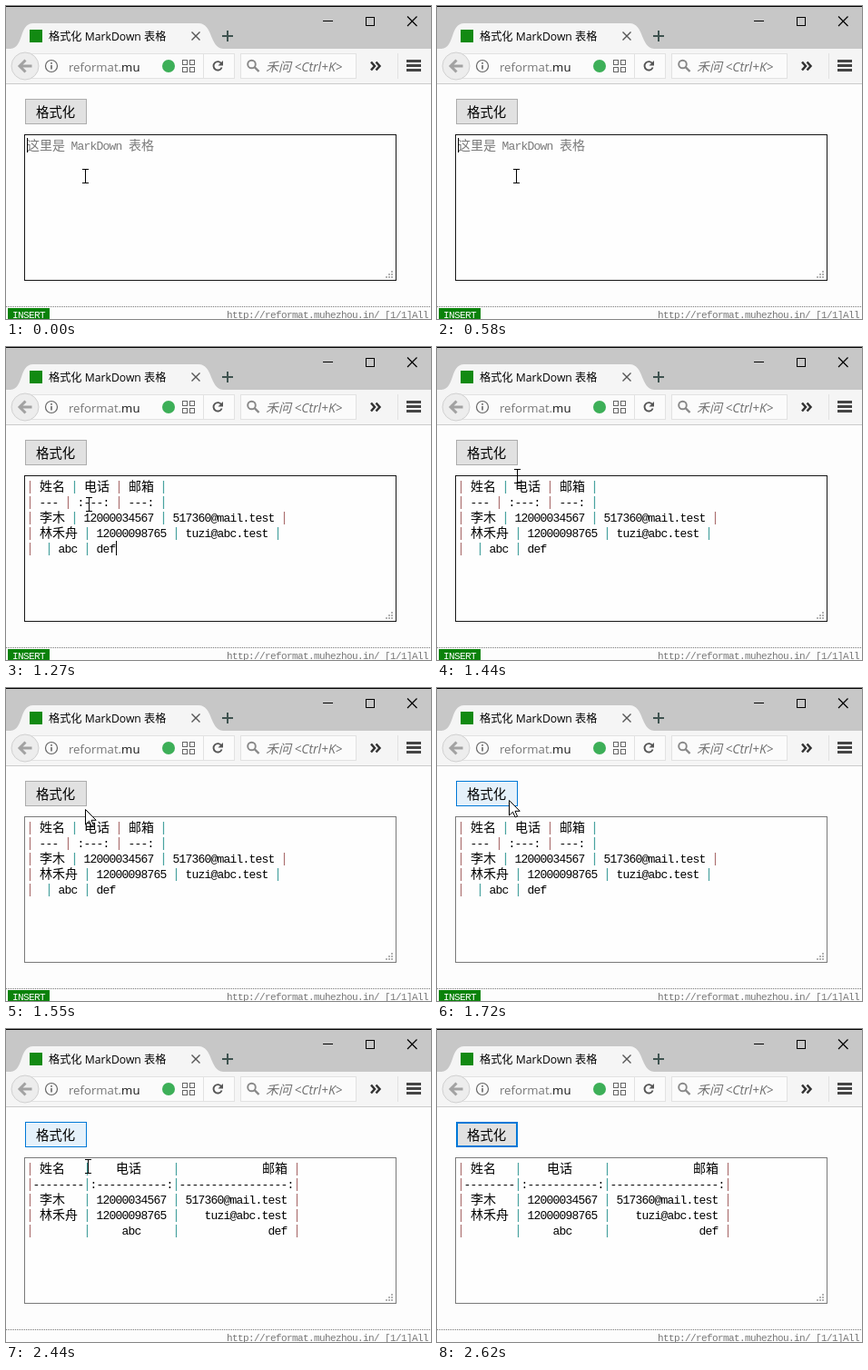
Animation of 468 by 344 pixels, one loop 3 s. Source, as an HTML page:

```html
<!DOCTYPE html>
<html lang="zh">
<head>
<meta charset="utf-8">
<style>
html, body { margin: 0; width: 100%; height: 100%; overflow: hidden; background: #fdfdfd; }
svg { display: block; }
text { white-space: pre; font-family: "Open Sans", "Noto Sans CJK SC", "Noto Sans CJK", sans-serif; }
.mono { font: 13px "Liberation Mono", monospace; letter-spacing: -0.8px; }
.small { font-size: 11px; letter-spacing: -0.6px; }
.pipe { font-size: 15px; }
.cjk { font-family: "Noto Sans CJK SC", "Noto Sans CJK", sans-serif; font-size: 14px; }
.line { fill: none; stroke: #000; shape-rendering: crispEdges; }
</style>
</head>
<body>
<svg width="468" height="344" viewBox="0 0 468 344">
  <!-- title bar and tab -->
  <rect width="468" height="47" fill="#c7c7c7"/>
  <rect width="468" height="1" fill="#000"/>
  <rect y="47" width="468" height="38" fill="#f5f5f5"/>
  <rect y="85" width="468" height="1" fill="#cbcbcb"/>
  <path d="M5 47C20 46 14 19 30 19H212C228 19 224 46 239 47Z" fill="#f5f5f5"/>
  <rect x="26" y="26" width="14" height="14" fill="#128a12"/>
  <text x="47" y="37.500" font-size="12.2">格式化 MarkDown 表格</text>
  <path d="M204.500 28.500l9 9m0-9l-9 9" stroke="#555" stroke-width="1.400"/>
  <path d="M238 33h12m-6-6v12" stroke="#3f5350" stroke-width="2"/>
  <path class="line" d="M349 16.500h11M396.500 12.500h9v9h-9z"/>
  <path d="M442 11.500l10.500 10.500m0-10.500l-10.500 10.500" stroke="#000" stroke-width="1.200"/>

  <!-- toolbar -->
  <rect x="28.500" y="52.500" width="223" height="27" fill="#fbfbfb" stroke="#e2e2e2"/>
  <circle cx="21" cy="66" r="15" fill="#ededed" stroke="#d0d0d0"/>
  <path d="M28.500 66H15m6.500-6.500l-6.500 6.500 6.500 6.500" fill="none" stroke="#a2a2a2" stroke-width="3"/>
  <circle cx="50" cy="66" r="6.500" fill="none" stroke="#666" stroke-width="1.200"/>
  <path d="M50 62v1.800M50 65v4.500" stroke="#666" stroke-width="1.600"/>
  <clipPath id="url"><rect x="60" y="53" width="87" height="26"/></clipPath>
  <text x="69" y="71.500" font-size="13.2" fill="#777" clip-path="url(#url)">reformat.<tspan fill="#111">muhe</tspan></text>
  <circle cx="179" cy="66" r="7" fill="#3daf58"/>
  <path class="line" style="stroke:#666" d="M194.500 59.500h5v5h-5zM202.500 59.500h5v5h-5zM194.500 67.500h5v5h-5zM202.500 67.500h5v5h-5z"/>
  <path class="line" style="stroke:#e2e2e2" d="M217.500 53v26M431.500 52v28"/>
  <path d="M237.300 63.500a4.700 4.700 0 1 0 .3 4" fill="none" stroke="#555" stroke-width="1.900"/>
  <path d="M239 60v5.500h-5.500z" fill="#555"/>
  <rect x="258.500" y="52.500" width="127" height="27" fill="#fbfbfb" stroke="#e2e2e2"/>
  <circle cx="270.500" cy="64" r="4.300" fill="none" stroke="#888" stroke-width="1.900"/>
  <path d="M273.500 67l5 5" stroke="#888" stroke-width="2.400"/>
  <text x="286" y="71.500" font-size="14" font-style="italic" fill="#707070">禾问 &lt;Ctrl+K&gt;</text>
  <path d="M402 61.500l4 4.500-4 4.500m5.500-9l4 4.500-4 4.500" fill="none" stroke="#333" stroke-width="2.500"/>
  <path d="M441 60.500h16m-16 5h16m-16 5h16" stroke="#444" stroke-width="3"/>

  <!-- page -->
  <rect id="btn"/>
  <text class="cjk" x="33" y="122" style="font-size:14.4px">格式化</text>
  <rect id="area" x="20.500" y="141.500" width="409" height="160" fill="#fefefe"/>
  <path d="M418 297h2v2h-2zm3 0h2v2h-2zm3 0h2v2h-2zm-3-3h2v2h-2zm3 0h2v2h-2zm0-3h2v2h-2z" fill="#b4b4b4"/>
  <g id="hint"></g>
  <g id="raw"></g>
  <g id="neat"></g>
  <rect id="caret" width="1" height="16"/>

  <!-- status line -->
  <path class="line" d="M0 330.500h468" style="stroke:#777" stroke-dasharray="1 1"/>
  <g id="mode">
    <rect x="2" y="332" width="46" height="12" fill="#0a820a"/>
    <text class="mono small" x="7" y="342.500" fill="#fff">INSERT</text>
  </g>
  <text class="mono small" x="243" y="342.500" fill="#777">http://reformat.muhezhou.in/ [1/1]All</text>

  <path id="beam" class="line" d="M-3.500-7.500h3l.5.5.5-.5h3M0-7v14M-3.500 7.500h3l.5-.5.5.5h3"/>
  <path id="arrow" d="M0 0V16.500L4 12.700 6.600 18.500 9 17.500 6.500 11.800H11.700Z" fill="#fff" stroke="#000"/>
</svg>
<script>
const $ = id => document.getElementById(id);
const LOOP = 3000, PASTE = 750, PRESS = 1860, RELEASE = 1960;

const people = [['李木', '12000034567', '517360@mail.test'], ['林禾舟', '12000098765', 'tuzi@abc.test']];
const cells = s => [...s].reduce((n, c) => n + (c > '\u2e80' ? 2 : 1), 0);
const gap = n => ' '.repeat(n);
const left = (s, n) => s + gap(n - cells(s));
const right = (s, n) => gap(n - cells(s)) + s;
const middle = (s, n) => left(gap((n - cells(s)) >> 1) + s, n);
const head = ['姓名', '电话', '邮箱'];

const rawRows = [
  `| ${head.join(' | ')} |`,
  '| --- | :---: | ---: |',
  ...people.map(p => `| ${p.join(' | ')} |`),
  '|  | abc | def'
];
const neatRows = [head, ...people, ['', 'abc', 'def']]
  .map(([a, b, c]) => `| ${left(a, 6)} | ${middle(b, 11)} | ${right(c, 16)} |`);
neatRows.splice(1, 0, `|${'-'.repeat(8)}|:${'-'.repeat(11)}:|${'-'.repeat(17)}:|`);

// Set rows on a 7px grid; wide characters take two cells.
function setRows(id, rows, color) {
  $(id).innerHTML = rows.map((row, i) => {
    let col = 0;
    return row.match(/[\u2e80-\uffff]+|\||[^|\u2e80-\uffff]+/g).map(run => {
      const pipe = run === '|', wide = run > '\u2e80';
      const type = pipe ? 'mono pipe' : wide ? 'cjk' : 'mono';
      const fill = !pipe ? color : col % 2 ? '#4aa3a0' : '#ad7272';
      const x = 23 + 7 * col - (pipe ? 1 : wide ? 0 : 0.4);
      col += cells(run);
      return `<text class="${type}" x="${x}" y="${158 + 17 * i}" fill="${fill}">${run}</text>`;
    }).join('');
  }).join('');
}
setRows('hint', ['这里是 MarkDown 表格'], '#7a7a7a');
setRows('raw', rawRows, '#000');
setRows('neat', neatRows, '#000');

// The pointer is redrawn only at these moments.
const ticks = [0, 1270, 1310, 1340, 1380, 1420, 1450, 1480, 1520, 1550, 1620, 1650, 1690, 1720,
  2440, 2480, 2510, 2550, 2580, 2620];

function pointer(t) {
  const glide = (t0, t1, a, b, ease = p => p) => {
    const p = ease((t - t0) / (t1 - t0));
    return a.map((v, i) => Math.round(v + (b[i] - v) * p));
  };
  if (t < 1270) return [87, 187];
  if (t < 1550) return glide(1270, 1550, [91, 173], [87, 133], p => 1 - (1 - p) ** 2);
  if (t < 2440) return glide(1550, 1720, [87, 133], [79, 123]);
  return glide(2440, 2620, [90, 151], [165, 360]);
}
const inArea = ([x, y]) => x > 20 && x < 430 && y > 140 && y < 302;
const inButton = ([x, y]) => x > 20 && x < 89 && y > 101 && y < 130;

const show = (id, on) => $(id).setAttribute('visibility', on ? 'visible' : 'hidden');
function set(id, attrs) {
  for (const k in attrs) $(id).setAttribute(k, attrs[k]);
}

function draw(t) {
  const i = ticks.findLastIndex(k => k <= t);
  const pos = pointer(ticks[i]);
  const hoverPos = pointer(ticks[Math.max(0, i - 1)]); // hover styles lag one tick

  show('hint', t < PASTE);
  show('raw', t >= PASTE && t < RELEASE);
  show('neat', t >= RELEASE);
  show('mode', t < PRESS);
  show('caret', t < 30 || t >= 580 && t < 1310);
  set('caret', t < PASTE ? { x: 23, y: 145 } : { x: 121, y: 213 });
  set('area', { stroke: inArea(hoverPos) ? '#171717' : '#7a7a7a' });

  const pressed = t >= PRESS && t < RELEASE, hover = inButton(hoverPos), focus = t >= PRESS;
  const w = focus && !hover ? 2 : 1;
  set('btn', {
    x: 21 + w / 2, y: 102 + w / 2, width: 68 - w, height: 28 - w, 'stroke-width': w,
    fill: pressed ? '#cce4f7' : hover ? '#e5f1fb' : '#e1e1e1',
    stroke: pressed ? '#005499' : hover || focus ? '#0078d7' : '#adadad'
  });

  const text = inArea(pos);
  show('beam', text);
  show('arrow', !text);
  set(text ? 'beam' : 'arrow', { transform: `translate(${pos[0] + 0.5} ${pos[1] + (text ? 0 : 0.5)})` });
}

function frame() {
  draw(performance.now() % LOOP);
  requestAnimationFrame(frame);
}
frame();
</script>
</body>
</html>
```
